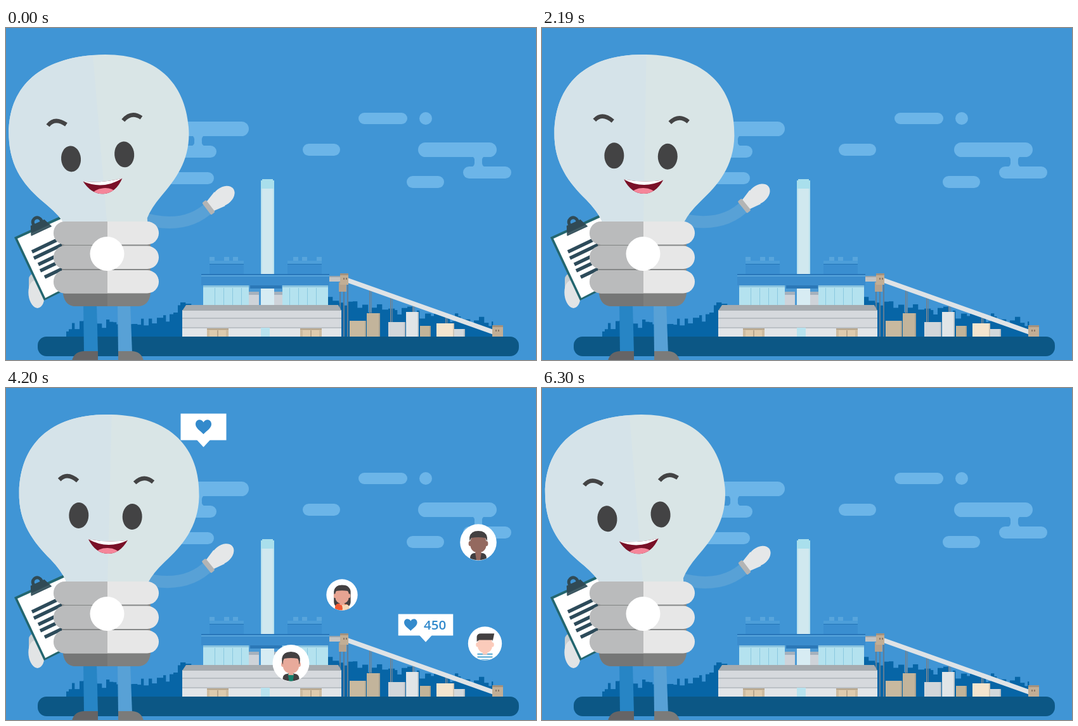
An HTML page with a canvas for the animation above (6.33 s loop, 836x525 px).

```html
<!DOCTYPE html>
<html lang="en">
<head>
<meta charset="utf-8">
<title>Light bulb guide at the power plant</title>
<style>
html, body { margin: 0; width: 100%; height: 100%; overflow: hidden; background: #4095d5; }
canvas { display: block; }
</style>
</head>
<body>
<canvas id="stage" width="836" height="525"></canvas>
<script>
const c = document.getElementById('stage').getContext('2d');
const LOOP = 6330, STEP = 30, TAU = Math.PI * 2;
const GROUND = 488, MIDDLE = 404.5 + 5;

function fill(color) { c.fillStyle = color; c.fill(); }
function box(x, y, w, h, color) { c.fillStyle = color; c.fillRect(x, y, w, h); }
function pill(x, y, w, h, color, r = Math.min(w, h) / 2) {
  c.beginPath(); c.roundRect(x, y, w, h, r); fill(color);
}
function oval(x, y, rx, ry, color, turn = 0) {
  c.beginPath(); c.ellipse(x, y, rx, ry, turn, 0, TAU); fill(color);
}
function shape(d, color) { c.fillStyle = color; c.fill(new Path2D(d)); }
function line(d, color, width, cap = 'butt') {
  c.strokeStyle = color; c.lineWidth = width; c.lineCap = cap; c.stroke(new Path2D(d));
}
function around(x, y, draw, turn = 0, scale = 1) {
  c.save(); c.translate(x, y); c.rotate(turn * Math.PI / 180); c.scale(scale, scale);
  draw(); c.restore();
}
function within(path, draw) { c.save(); c.clip(path); draw(); c.restore(); }
function seeded(seed) {
  return () => (seed = seed * 16807 % 2147483647) / 2147483647;
}

// One cluster: a long pill, a short pill below joined by a neck, and a loose one
function cloud(x, y, side) {
  const col = '#6cb5e8', at = (dx, w) => side > 0 ? x + dx : x - dx - w;
  pill(at(0, 124), y, 124, 23, col);
  pill(at(71, 76), y + 38, 76, 19, col);
  pill(at(-18, 59), y + 53, 59, 19, col);
  const n = at(95, 0), m = y + 30;
  shape(`M${n - 10} ${y + 22}Q${n - 5} ${m - 6} ${n - 6} ${m}Q${n - 5} ${m + 7} ${n - 11} ${m + 9}H${n + 11}Q${n + 5} ${m + 7} ${n + 6} ${m}Q${n + 5} ${m - 6} ${n + 10} ${y + 22}Z`, col);
}

function clouds() {
  const col = '#6cb5e8';
  cloud(650, 181, 1);
  pill(556, 134, 77, 18, col);
  oval(662, 143, 10, 10, col);
  pill(468, 183, 59, 19, col);
  pill(240, 148, 143, 23, col);
  pill(240, 186, 92, 19, col);
  pill(240, 228, 88, 19, col);
  shape('M293 170Q298 172 297 179Q298 185 292 187H314Q308 185 309 179Q308 172 313 170Z', col);
}

// Roofs vary by up to 17 px above a slope from low to high
function skyline(x, end, from, to, rand) {
  const start = x;
  while (x < end) {
    const w = 4 + Math.floor(rand() * 7);
    const h = from + (to - from) * (x - start) / (end - start) + rand() * 17;
    box(x, GROUND - h, Math.min(w, end - x) + .3, h, '#0765a6');
    x += w;
  }
}

function yard() {
  const slope = x => 398 + (x - 540) * .362;
  for (const x of [573, 606, 641, 693]) {
    const top = slope(x) + 3;
    box(x, top, 2, GROUND - top, '#6c8497');
    box(x + 3, top, 1, GROUND - top, '#6c8497');
  }
  for (const x of [526, 532, 538]) box(x, 404, 2, 84, '#5f7d97');
  const blocks = [[542, 26, 25, '#c8b99f'], [569, 21, 37, '#c2b49b'], [603, 27, 23, '#d2d6da'],
    [631, 20, 39, '#e1e5e7'], [653, 17, 17, '#c2b398'], [679, 28, 21, '#f5e5ce'], [707, 17, 12, '#d3d8db']];
  for (const [x, w, h, col] of blocks) {
    box(x, GROUND - h, w, h, col);
    box(x + w - 2, GROUND - h, 2, h, 'rgba(70,90,110,.22)');
  }
  line('M539 399L769 481', '#dfe3e6', 7.5);
  box(510, 392, 18, 9, '#c3c3c2');
  box(510, 392, 18, 2, '#99a4ac');
  box(525, 402, 12, 15, '#b5a28d');
  for (const [x, y, w] of [[527, 388, 13], [767, 470, 17]]) {
    box(x, y, w, 18, '#c2ae95');
    box(x, y, w, 3, '#a3917d');
    box(x + 5, y + 7, 2, 3, '#8b7968');
    box(x + 9, y + 7, 2, 3, '#8b7968');
  }
}

// Jelly stretch of the plant, k = 0 at rest
function warp(x, y, k) {
  const h = GROUND - y, d = x - MIDDLE;
  const rise = Math.min(1, (h / 95) ** 2);
  return [x + k * (d * (.015 + .07 * rise) + (x > 412 ? 1.3 : -.3) * rise), GROUND - h * (1 + k * (.03 + .0003 * h))];
}
function soft(pts, color, k) {
  c.beginPath();
  pts.forEach((p, i) => {
    const q = pts[(i + 1) % pts.length];
    for (let u = 0; u < 1; u += .125) c.lineTo(...warp(p[0] + (q[0] - p[0]) * u, p[1] + (q[1] - p[1]) * u, k));
  });
  fill(color);
}

function plant(k) {
  const bar = (x, y, w, h, col) => soft([[x, y], [x + w, y], [x + w, y + h], [x, y + h]], col, k);
  const pair = (x, y, w, h, col) => { bar(x, y, w, h, col); bar(2 * MIDDLE - x - w, y, w, h, col); };
  const centre = 402;

  bar(383, 405, 54, 33, '#4b9ad5');
  pair(383, 417, 16, 21, '#ced3d9');
  pair(383, 417, 16, 5, '#a5b1bd');
  bar(centre, 412, 21, 26, '#d7ecf3');

  bar(centre, 241, 21, 148, '#b9e1ed');
  bar(centre + 2, 239, 17, 150, '#d0e8ef');
  bar(centre, 241, 21, 13, '#a9dfec');
  bar(centre + 2, 239, 17, 3, '#a9dfec');

  pair(321, 368, 54, 21, '#3a8ed0');
  pair(321, 368, 54, 5, '#4c9ed9');
  pair(321, 373, 54, 1, '#2374b7');
  for (const x of [321, 344, 358]) pair(x, 362, 8, 6, '#58a5dc');

  pair(311, 407, 72, 31, '#b4e2ef');
  for (let x = 329; x < 380; x += 14) pair(x, 411, 1, 27, '#8bc8df');
  pair(311, 407, 72, 3, '#8bc4df');
  bar(308, 389, 202, 18, '#3a8ccd');
  bar(308, 389, 202, 1.5, '#2471b3');
  bar(308, 391, 202, 2, '#57a5dc');
  bar(385, 407, 50, 5, '#2b78b7');

  bar(278, 446, 251, 42, '#d6d9dd');
  soft([[284, 438], [524, 438], [529, 447], [278, 447]], '#a6abaf', k);
  bar(278, 458, 251, 2, '#b8bdc2');
  bar(278, 474, 251, 14, '#e2e5e8');
  bar(278, 473, 251, 2, '#bcc1c6');
  bar(centre, 474, 14, 14, '#b8e3ef');
  for (const x of [317, 464]) {
    bar(x, 475, 34, 13, '#cdbb9f');
    bar(x + 4, 478, 26, 10, '#decbae');
    bar(x + 16, 478, 2, 10, '#b7a68d');
    bar(x, 475, 34, 2, '#b5a48b');
  }
}

function clipboard() {
  pill(36, 388, 23, 32, '#c9ced0', 9);
  oval(48, 421, 12.5, 22, '#e2e4e5', -.12);
  shape('M13 331L94 294L137 393L60 431Z', '#23666f');
  shape('M18 333L93 299L131 391L62 427Z', '#fff');
  for (let i = 0; i < 5; i++) {
    const x = 41 + 5 * i - (i % 2) * 2, y = 354 + 10 * i;
    line(`M${x} ${y}l46 -22`, '#2d4b5a', 5.5);
  }
  around(53, 315, () => {
    line('M-7 -9a7 7 0 1 1 14 0a7 7 0 1 1 -14 0', '#304a55', 5);
    shape('M-12 -8H12L18 7H-18Z', '#304a55');
    box(-17, 3, 34, 3, '#415d66');
  }, -25);
}

function arm(turn) {
  around(225, 300, () => {
    line('M-11 1Q59 19 97 -21', '#58a1d6', 19);
    around(94, -19, () => {
      shape('M2 -9L22 -14V14L2 9Z', '#e5e7e8');
      oval(29, 0, 20, 14, '#e5e7e8');
      pill(-4, -12, 8, 24, '#b3b4b4', 2);
    }, -39);
  }, turn);
}

function legs() {
  shape('M122 436H143L145 514H123Z', '#2785c5');
  shape('M176 436H196L199 514H177Z', '#58a1d6');
  shape('M104 526Q108 510 126 511H145V526Z', '#656466');
  shape('M177 526V511H196Q213 510 217 526Z', '#7b7b7a');
}

function socket() {
  shape('M90 416H228V420Q225 440 208 440H110Q93 440 90 420Z', '#7f807f');
  shape('M90 416H160V440H110Q93 440 90 420Z', '#757676');
  box(88, 338, 140, 50, '#858787');
  for (let y = 306; y < 400; y += 38.5) {
    pill(75, y, 166, 36.5, '#e7e7e7');
    c.beginPath(); c.roundRect(75, y, 85, 36.5, [18, 0, 0, 18]); fill('#babbbc');
  }
  oval(159.5, 357, 27, 27, '#fff');
}

const BULB = new Path2D('M159 42C254 42 301 92 301 168C301 217 276 247 249 273Q231 291 224 306V320H94V306Q87 291 69 273C42 247 17 217 17 168C17 92 64 42 159 42Z');
const MOUTH = new Path2D('M128 240Q159 245 190 240Q178 262 159 262Q140 262 128 240Z');

function head(turn) {
  around(159, 318, () => {
    c.translate(-159, -318);
    c.fillStyle = '#d9e5e6';
    c.fill(BULB);
    within(BULB, () => box(0, 30, 160, 300, '#d5e3e9'));
    line('M80 147Q92 134 109 148M199 149Q213 135 228 147', '#434344', 6.5);
    for (const x of [112, 196.4]) oval(x, 202.6, 15.5, 20.5, '#434344');
    within(MOUTH, () => {
      box(125, 236, 70, 30, '#7a1027');
      shape('M128 236H190V240Q159 256 128 240Z', '#fff');
      oval(159, 262, 18, 9, '#f5869a');
    });
  }, turn);
}

function bubble(x, y, w, h, tip, draw, scale) {
  around(x, y, () => {
    box(-w / 2, -h / 2, w, h, '#fff');
    shape(`M${-tip} ${h / 2 - 1}H${tip}L0 ${h / 2 + tip}Z`, '#fff');
    draw();
  }, 0, scale);
}
function heart(x, w) {
  around(x, 0, () => shape('M0 11C-5 6 -12 2 -12 -4C-12 -12 -3 -13 0 -7C3 -13 12 -12 12 -4C12 2 5 6 0 11Z', '#338acc'), 0, w / 24);
}

function likes(t) {
  bubble(311.5, 61.5, 72, 42, 11, () => heart(0, 25), pop(t, 2760, 5010));
  bubble(662, 374.5, 84, 33, 10, () => {
    heart(-23, 20);
    c.font = '600 20px "Open Sans", "Noto Sans", sans-serif';
    c.fillStyle = '#338acc';
    c.fillText('450', -3, 7);
  }, pop(t, 2910, 5130) * (1 + .03 * bump(t, 4200, 700)));
}

const FACES = [
  { x: 449.5, y: 435, r: 29, off: 5280, skin: '#e8aa9b', coat: '#433f40', shirt: '#16816d', full: true },
  { x: 530, y: 327, r: 24.7, off: 5850, skin: '#e7a492', coat: '#f15a33', shirt: '#f4d8b8', long: true },
  { x: 755.5, y: 404, r: 26.7, off: 5910, skin: '#fbcbbb', coat: '#fff', shirt: '#62afd6', tuft: true },
  { x: 745, y: 244, r: 28.8, off: 6090, skin: '#94695f', coat: '#403e40', shirt: '#94695f' }
];
const DISC = new Path2D('M-28.5 0a28.5 28.5 0 1 1 57 0a28.5 28.5 0 1 1 -57 0');

function face(f, t, i) {
  const hair = '#434041';
  around(f.x, f.y, () => {
    oval(0, 0, 29, 29, '#fff');
    within(DISC, () => {
      if (f.long) pill(-15, -18, 31, 44, hair, 13);
      pill(-13, 17, 26, 20, f.coat, 7);
      if (f.tuft) for (let y = 17; y < 29; y += 5) box(-13, y, 26, 2.5, f.shirt);
      else shape('M-5 16H5L3 29H-3Z', f.shirt);
      if (f.long) { oval(-6, 25, 7, 9, f.coat); oval(8, 26, 6, 8, f.shirt); }
      box(-4, 9, 8, 10, f.skin);
      for (const x of [-13, 13]) oval(x, 2, 2.5, 4, f.skin);
      if (f.full) pill(-14, -17, 28, 25, hair, 11);
      pill(-12.5, -12, 25, 28, f.skin, 11);
      if (f.tuft) shape('M-14 -3V-12Q-13 -18 -5 -17H16L13 -3V-6H-10Z', hair);
      else shape('M-14 -2V-8Q-12 -18 0 -18Q12 -18 14 -8V-2L11 -7Q0 -9 -11 -7Z', hair);
    });
  }, 0, f.r / 29 * pop(t, 2700 + 90 * i, f.off));
}

// Springs up from `on`, gone at `off`, both over 300 ms
function pop(t, on, off) {
  const u = Math.max(0, Math.min(1, (t - on) / 300, (off - t) / 300)) - 1;
  return Math.max(0, 1 + 2.7 * u ** 3 + 1.7 * u * u);
}
function bump(t, mid, half) {
  const u = (t - mid) / half;
  return Math.abs(u) < 1 ? Math.cos(u * Math.PI / 2) ** 2 : 0;
}

function draw(t) {
  const tilt = -.2 + 5.2 * Math.cos(TAU * (t - 1450) / 3440);
  const rand = seeded(77);
  box(0, 0, 836, 525, '#4095d5');
  clouds();
  skyline(95, 264, 6, 22, rand);
  skyline(264, 300, 36, 48, rand);
  skyline(508, 768, 46, 14, rand);
  pill(50, GROUND, 759, 31, '#0c5785', 14);
  yard();
  plant(bump(t, 800, 720) + bump(t, 3300, 920));
  FACES.forEach((f, i) => face(f, t, i));
  likes(t);
  clipboard();
  arm(Math.max(-.3, .27 * (1.5 - tilt)));
  legs();
  head(tilt);
  socket();
}

const start = performance.now();
function tick() {
  const t = (performance.now() - start) % LOOP;
  draw(Math.floor(t / STEP) * STEP);
  requestAnimationFrame(tick);
}
tick();
</script>
</body>
</html>
```
